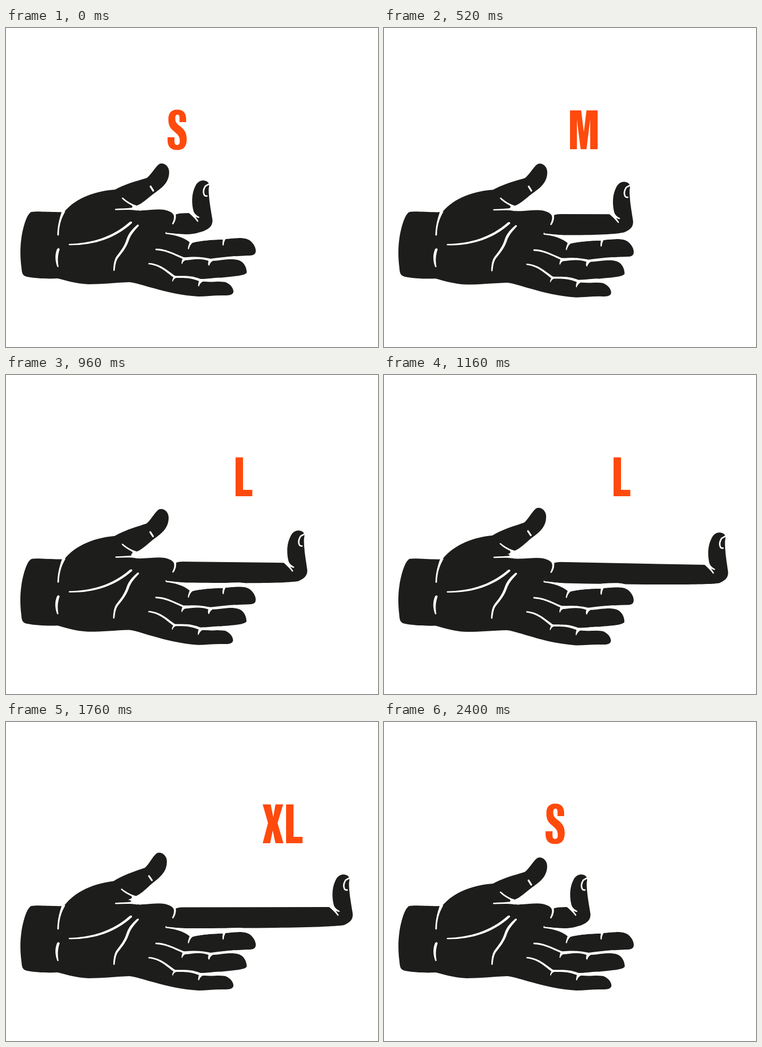
Write an HTML page that moves like this. It is 700x600 px and loops after 2.88 s.

```html
<!DOCTYPE html>
<html lang="en">
<head>
<meta charset="utf-8">
<title>Finger sizes</title>
<style>
  html, body { margin: 0; width: 100%; height: 100%; overflow: hidden; background: #fff; }
  svg { display: block; width: 100vw; height: 100vh; }
  .ink { fill: #1d1d1b; }
  .cut { fill: #fff; }
  .line { fill: none; stroke: #fff; stroke-linecap: round; stroke-linejoin: round; }
  #sizes path { fill: #ff4a0d; visibility: hidden; }
  #sizes path.on { visibility: visible; }
</style>
</head>
<body>
<svg viewBox="0 0 700 600">
  <g id="sizes">
    <path aria-label="S" d="M339 177V172C339 159 333 153.5 322 153.5C311 153.5 305.5 160 305.5 172C305.5 186 311 190 318 196C325 202 327 205 327 213C327 218 325 220 322 220C319 220 317 218 317 213V205.5H304V211C304 224 311 229.5 322 229.5C334 229.5 340 223 340 209C340 196 335 191 328 185C321 180 318.5 177 318.5 170C318.5 165 320 163 322.5 163C325.5 163 326.5 165 326.5 169V177Z"/>
    <path aria-label="M" d="M350 155H371L376 196L381 155H402V228H388V172L381 228H370L363 172V228H350Z"/>
    <path aria-label="L" d="M432 155H446V216H463.5V228H432Z"/>
    <path aria-label="XL" d="M483 155H498L503 179L507 155H521.5L511 190L522 228H507L502 204L497 228H483L493 190ZM527 155H541V216H558V228H527Z"/>
  </g>

  <g id="hand">
    <path class="ink" d="M48 346C60 344 85 347 108 346L160 330L215 328L236 336.5L234 339L250 343.5C270 343 285 340 298 342C312 345 317 350 317 358L314 370L300 385L302 387C325 390 340 395 347 403L350 404C365 400 390 398 410 397C440 394 450 394 458 399C465 404 470 412 470 419C470 427 464 428 455 428C430 429 405 431 386 436C400 436 420 433 435 436C447 438 453 450 453 460C450 466 430 467 400 470C385 471 375 473 366 475L372 476.5C385 478 400 476 413 478C423 482 428 490 428 496C427 504 415 503 405 503C390 503 375 505 362 505C330 503 300 496 280 490C262 486 245 479 232 478C205 479 180 482 155 482C130 481 110 474 97 471C80 472 55 471 40 468C30 466 30 460 29 450C27 435 26 415 29 395C32 375 38 355 44 349Q46 346 48 346Z"/>

    <g id="thumb">
      <path class="ink" d="M108 348C125 325 160 307 205 304C225 293 245 288 265 282C272 277 280 263 287 257C294 251 307 258 307 271C307 288 297 298 283 308C272 315 258 330 246 334C241 334 239 333 236 332L238 336Q237 340 230 340L110 380Z"/>
      <path class="cut" d="M218 320.5Q217 318.5 220 319C228 326 236 331 246 334L243 337C235 333 225 328 218 320.5Z"/>
      <path class="line" stroke-width="3.4" d="M272 298L277 306"/>
    </g>

    <g id="finger">
      <path class="ink" id="shaft"/>
      <g id="tip">
        <path class="cut" d="M343.5 346.5L353 345C355 350 359 353 364 355.5Q364 358 361 357L356.5 355L362 363Q361 366 359 363C355 358 349 352 343.5 347.5Z"/>
        <path class="line" stroke-width="2.8" d="M381 294L375 297.5C371 304 371 310 373 314Q374.500 316.500 378 316"/>
      </g>
    </g>

    <g class="cut">
      <!-- wrist and palm lines -->
      <path d="M105 345C100 360 97 372 96.500 389Q98 392 99.500 389C100 372 103 360 111.500 345Z"/>
      <path d="M96 416Q99 412 101 416C97 428 97 438 99 449Q97 451 96 448C92 436 92 426 96 416Z"/>
      <path d="M119 406C160 405 200 394 233 364.500Q238 363 237 367C205 396 165 409 119 408.500Q117 407 119 406Z"/>
      <path d="M247 370C239 377 231 385 227 397C222 413 214 421 207 431C203 438 202 448 202 456Q203 458 204.500 456C206 444 207 437 212 431C219 422 226 414 231 400C235 388 242 381 250 372Q250 369 247 370Z"/>
      <path d="M206 340C218 339.500 228 339 238 338L247 340V343.500C235 341 220 342 206 342.500Q204 341 206 340Z"/>
      <path d="M311 345C317 349 318 358 312.500 368Q314 371 315.500 368C320 361 320 355 319.500 350L320 344Z"/>
      <!-- gaps between the fingers -->
      <path d="M300 385C315 386 325 388 338 388.500C365 391 390 391 404 390Q410 387 440 387Q458 388 467 396L458 399C450 394 440 394 413 397Q410 402 409.500 409Q406 411 408 398C390 398 365 400 351 404Q346 408 344 416Q340 418 345.500 403C335 394 318 389 301 387.500Q299 386 300 385Z"/>
      <path d="M282 415C300 415 312 422 334 431C345 432 355 428 385 434C400 432 415 430 432 429V435C415 434 400 438 389 438Q384 441 382.500 447Q379 447 381 438C365 432 350 436 337 437Q333 439 331.500 444Q329 444 332 434C310 424 300 419 282 418Q280 416 282 415Z"/>
      <path d="M268.500 442C290 443 302 455 318 466C335 467 345 464 366 472C380 472 390 470 402 469.500L400 476.500C388 478.500 380 477 370 477Q365 480 363 486Q360 487 363 476C345 469 335 470 320 470Q315 472 314 477Q311 477 315 469C300 458 290 447 268.500 444.500Q267 443 268.500 442Z"/>
    </g>
  </g>
</svg>
<script>
  const LOOP = 2880, STEP = 40, BACK = 1920, BACK_LENGTH = 480;
  const $ = id => document.getElementById(id);
  const labels = [...$('sizes').children];

  // [time, value] pairs for the outward motion
  const reach = [[0, 0], [280, 50.5], [480, 78], [560, 82], [760, 134.5], [960, 178], [1120, 243], [1160, 258.5], [1240, 264]];
  const tilt = [[0, 0], [280, .27], [760, .35], [1160, .65], [1440, 0]];
  const bend = [[0, 0], [280, .1], [760, .1], [1160, .55], [1440, 0]];
  const lift = [[0, 0], [280, 0], [760, -.7], [1160, -2.4], [1440, -2.9]];
  const labelTimes = [[0, 0], [480, 1], [960, 2], [1240, 3], [2240, 0]];

  function track(keys, t) {
    const i = keys.findIndex(k => k[0] > t);
    if (i < 0) return keys[keys.length - 1][1];
    const [t0, v0] = keys[i - 1], [t1, v1] = keys[i];
    return v0 + (v1 - v0) * (t - t0) / (t1 - t0);
  }

  function shaft(d) {
    const x = n => (n + d).toFixed(2);
    return `M319 351Q322 349 332 348.500L${x(344)} 348L${x(353)} 352V345
      C${x(349)} 330 ${x(349)} 312 ${x(356)} 298
      C${x(360)} 289 ${x(367)} 286 ${x(373)} 287
      C${x(380)} 288 ${x(383)} 292 ${x(382)} 299
      C${x(381)} 303 ${x(381.5)} 308 ${x(382)} 316
      C${x(383)} 330 ${x(386)} 345 ${x(388.5)} 361
      C${x(389)} 372 ${x(383)} 377 ${x(372)} 382
      C${358 + .95 * d} 386.500 ${350 + .5 * d} 388 338 388L302 386L300 370Z`;
  }

  const turn = (id, angle, x, y) => $(id).setAttribute('transform', `rotate(${angle} ${x} ${y})`);

  function render(now) {
    const t = Math.floor(now % LOOP / STEP) * STEP;
    const p = Math.min(1, Math.max(0, (t - BACK) / BACK_LENGTH));
    const left = Math.pow(1 - p, 1.83);
    const d = track(reach, t) * left;

    $('shaft').setAttribute('d', shaft(d));
    $('tip').setAttribute('transform', `translate(${d} 0)`);
    turn('hand', track(tilt, t), 60, 410);
    turn('finger', track(bend, t), 310, 368);
    turn('thumb', track(lift, t) * left, 110, 352);

    const size = labelTimes.filter(k => k[0] <= t).pop()[1];
    labels.forEach((el, i) => el.classList.toggle('on', i === size));
  }

  const start = performance.now();
  function frame() {
    render(performance.now() - start);
    requestAnimationFrame(frame);
  }
  frame();
</script>
</body>
</html>
```
